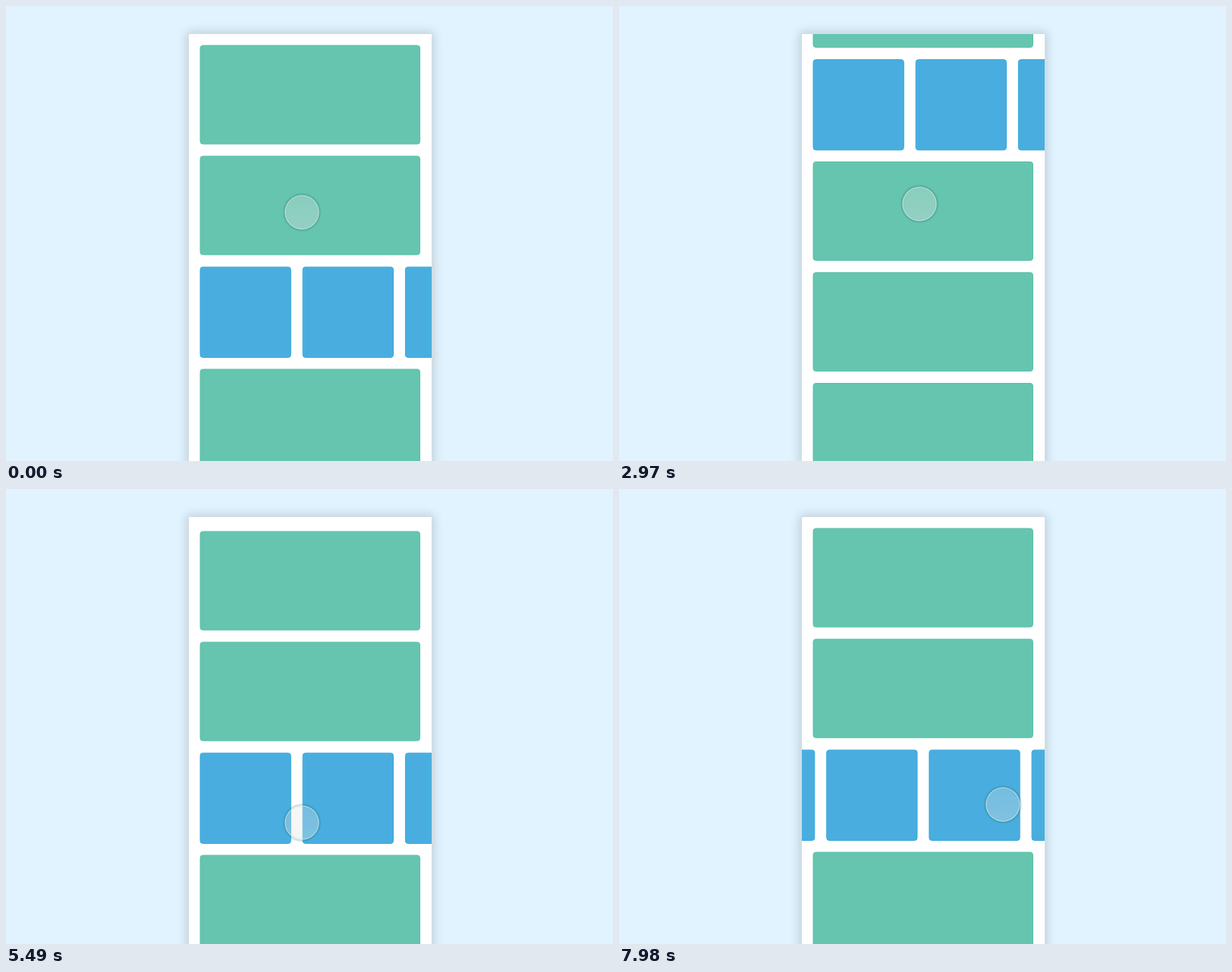
An HTML page for the animation above (8000 ms loop, 800 px wide and 600 px high).

```html
<!DOCTYPE html>
<html lang="en">
<head>
<meta charset="utf-8">
<title>Nested scrolling</title>
<style>
  html, body { margin: 0; width: 100%; height: 100%; overflow: hidden; background: #e0f3fe; }
  svg { display: block; width: 100vw; height: 100vh; }
  .green { fill: #66c5af; stroke: #5cc1a9; }
  .blue { fill: #49aedf; stroke: #36a8da; }
</style>
</head>
<body>
<svg viewBox="0 0 800 600">
  <defs>
    <filter id="soft" x="-20%" y="-20%" width="140%" height="140%"><feGaussianBlur stdDeviation="7"/></filter>
    <filter id="rim" x="-30%" y="-30%" width="160%" height="160%"><feGaussianBlur stdDeviation="0.9"/></filter>
    <clipPath id="screen"><rect x="241" y="37" width="320" height="563"/></clipPath>
    <linearGradient id="glass" x1="0" y1="0" x2="0" y2="1">
      <stop id="top" offset="0" stop-color="#e2e4e4"/>
      <stop id="bottom" offset="1" stop-color="#e2e4e4"/>
    </linearGradient>
  </defs>
  <rect width="800" height="600" fill="#e0f3fe"/>
  <rect x="238" y="34" width="326" height="660" opacity=".15" filter="url(#soft)"/>
  <rect x="240.5" y="36.5" width="321" height="640" fill="#fff" stroke="#d3dce1"/>
  <g clip-path="url(#screen)">
    <g id="list"><g id="row"></g></g>
  </g>
  <g id="finger">
    <circle r="23" fill="none" stroke="#0b5f58" stroke-opacity=".36" stroke-width="2" filter="url(#rim)"/>
    <circle r="22.5" fill="url(#glass)"/>
    <circle r="22" fill="none" stroke="#fff" stroke-opacity=".42" stroke-width="1.4"/>
  </g>
</svg>
<script>
const LOOP = 8000, STEP = 30;
const $ = id => document.getElementById(id);

// Each track is a list of [time, value] keys.
const scrollY = [[1510, 0], [1710, 69], [1850, 105], [2250, 178], [2970, 273.5], [3060, 280.5],
  [3200, 288], [3500, 325], [3900, 345], [4350, 352], [4500, 352], [4710, 297], [5000, 150],
  [5200, 60], [5490, -4], [5540, -6], [5720, 0]];
const scrollX = [[5700, 0], [6050, 92], [6240, 126], [6900, 190], [7440, 228], [7980, 252.7]];
const fingerX = [[1850, 390], [2970, 396], [3120, 398], [3500, 408], [4710, 419], [5000, 410],
  [5490, 390], [5690, 420], [6060, 324], [6240, 333], [7980, 506]];
const fingerY = [[1490, 272], [1710, 197], [1850, 152], [1950, 145], [2970, 261], [3120, 272],
  [3220, 272], [3500, 165], [3700, 130], [4400, 124], [4500, 124], [4710, 180], [5000, 333],
  [5150, 400], [5490, 440], [5700, 440], [6240, 426], [7980, 416]];
const press = [[1470, 0], [1560, 1], [1900, 1], [2000, 0], [3150, 0], [3220, 1], [3600, 1],
  [3700, 0], [4500, 0], [4750, 1], [5100, 1], [5200, 0], [5640, 0], [5720, 1], [6050, 1], [6150, 0]];

const slope = (a, b) => (b[1] - a[1]) / (b[0] - a[0]);

// Tangent that never overshoots the neighbouring keys.
function tangent(keys, i) {
  if (i === 0 || i === keys.length - 1) return 0;
  const l = slope(keys[i - 1], keys[i]), r = slope(keys[i], keys[i + 1]);
  return l * r <= 0 ? 0 : 2 * l * r / (l + r);
}

function at(keys, t) {
  const last = keys.length - 1;
  if (t <= keys[0][0]) return keys[0][1];
  if (t >= keys[last][0]) return keys[last][1];
  let i = 0;
  while (t > keys[i + 1][0]) i++;
  const a = keys[i], b = keys[i + 1], d = b[0] - a[0], u = (t - a[0]) / d;
  // The final key keeps moving instead of easing to a stop.
  const ma = tangent(keys, i);
  const mb = i + 1 === last ? slope(a, b) : tangent(keys, i + 1);
  const v = 1 - u;
  return a[1] * v * v * (1 + 2 * u) + b[1] * u * u * (3 - 2 * u) + d * u * v * (ma * v - mb * u);
}

function card(parent, cls, x, y, w, h) {
  const r = document.createElementNS("http://www.w3.org/2000/svg", "rect");
  const attrs = { class: cls, x, y, width: w, height: h, rx: 3.5 };
  for (const k in attrs) r.setAttribute(k, attrs[k]);
  parent.appendChild(r);
}

[52, 198, 479, 625, 771, 917, 1063].forEach(y => card($("list"), "green", 256, y, 289.5, 130));
for (let i = 0; i < 8; i++) card($("row"), "blue", 256 + i * 135.2, 344.2, 119.3, 119.2);

function draw(time) {
  const t = Math.floor((time % LOOP) / STEP) * STEP;
  const p = at(press, t);
  $("list").setAttribute("transform", `translate(0 ${-at(scrollY, t)})`);
  $("row").setAttribute("transform", `translate(${-at(scrollX, t)} 0)`);
  $("finger").setAttribute("transform",
    `translate(${at(fingerX, t)} ${at(fingerY, t)}) scale(${1 - 0.06 * p})`);
  $("top").setAttribute("stop-opacity", 0.28 + 0.1 * p);
  $("bottom").setAttribute("stop-opacity", 0.36 + 0.2 * p);
}

const start = performance.now();
function tick() {
  draw(performance.now() - start);
  requestAnimationFrame(tick);
}
tick();
</script>
</body>
</html>
```
